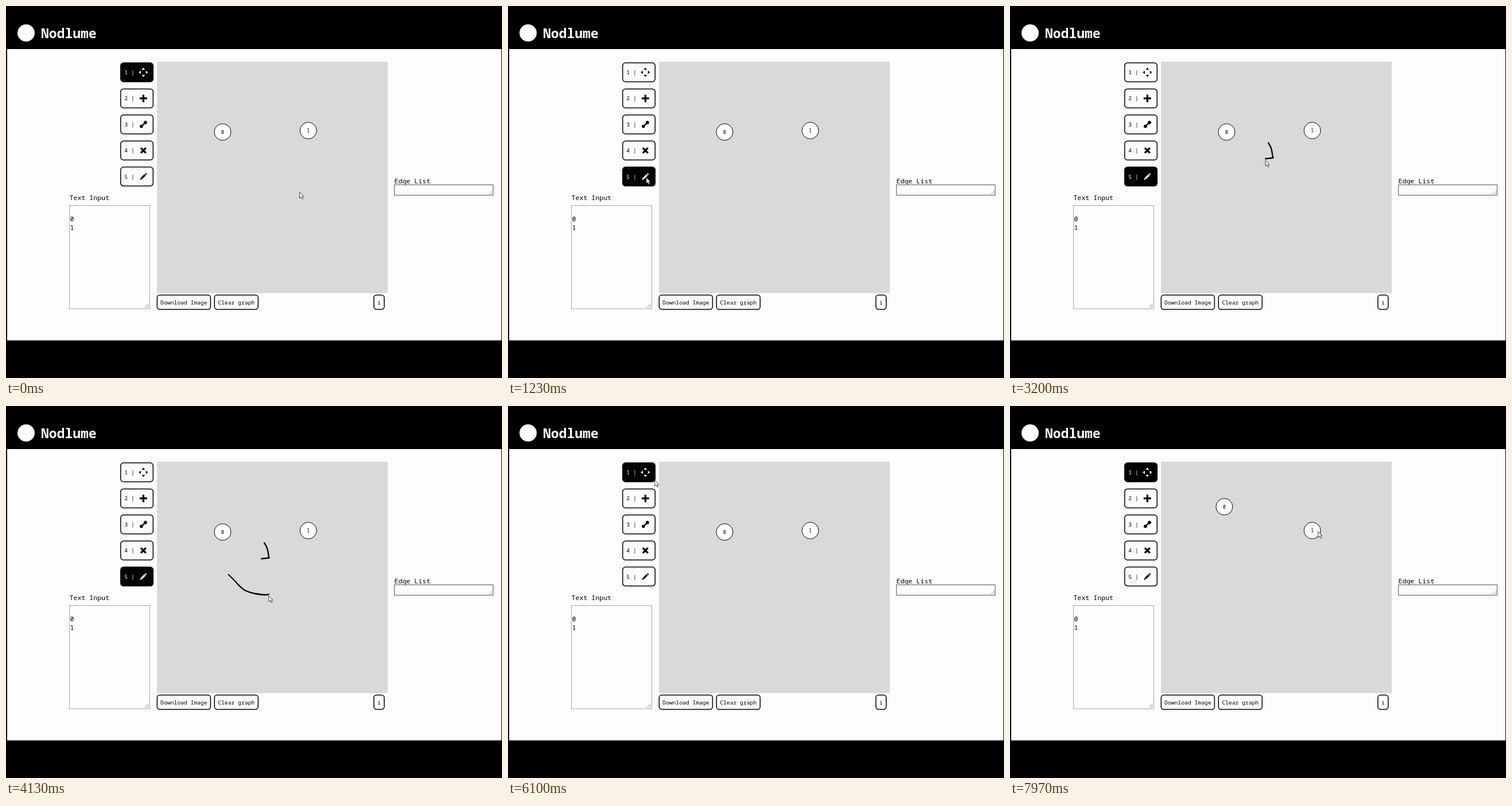
Animation of 864 by 648 pixels, one loop 8000 ms. Source, as an HTML page:

```html
<!DOCTYPE html>
<html lang="en">
<head>
<meta charset="utf-8">
<title>Graph editor</title>
<style>
  html, body { margin: 0; width: 100%; height: 100%; overflow: hidden; background: #000; }
  svg { display: block; width: 100%; height: 100%; }
  text { font-family: "Noto Sans Mono", "DejaVu Sans Mono", monospace; font-size: 9.7px; fill: #000; }
  .label { font-size: 11.6px; }
  .mid { text-anchor: middle; }
  .box { fill: #fdfdfd; stroke: #000; stroke-width: 1.5; }
  .tool { color: #000; }
  .tool text { fill: currentColor; }
  .tool.on { color: #fff; }
  .tool.on .box { fill: #000; }
  .icon { fill: currentColor; stroke: currentColor; stroke-width: 0; }
  .node circle { fill: #fff; stroke: #000; }
  .node text { font-size: 8.6px; text-anchor: middle; }
  .stroke { fill: none; stroke: #000; stroke-width: 2.3; stroke-linecap: round; stroke-linejoin: round; }
</style>
</head>
<body>
<svg viewBox="0 0 864 648">
  <rect width="864" height="648"/>
  <rect x="2" y="75" width="861" height="507.5" fill="#fdfdfd"/>
  <circle cx="35" cy="47" r="15" fill="#fff"/>
  <text x="61" y="55.5" style="font-size:23px;font-weight:700;fill:#fff">Nodlume</text>

  <rect x="263" y="97" width="402" height="403" fill="#d9d9d9"/>
  <g id="tools"></g>

  <text class="label" x="110.5" y="338">Text Input</text>
  <rect x="110.5" y="347.5" width="140" height="180" fill="#fdfdfd" stroke="#aaa89a"/>
  <text class="label" x="111.5" y="374.5">0</text>
  <text class="label" x="111.5" y="389.5">1</text>
  <path d="M242 525.5l6.5-6.5M246 525.5l2.5-2.5" stroke="#777"/>

  <text class="label" x="676.5" y="308.5">Edge List</text>
  <rect x="676.5" y="311.5" width="172" height="18" fill="#fdfdfd" stroke="#555"/>
  <path d="M841 328l6.5-6.5M845 328l2.5-2.5" stroke="#a5a55a"/>

  <g id="buttons"></g>
  <path id="nose" class="stroke" d="M450 238.5Q454 244 455.5 250T457 259L458.5 264.5L450 265.5L445 266"/>
  <path id="smile" class="stroke" d="M387.5 293.5L393 299L400 306Q408 316 416 321Q424 325 432 326.500T450 329Q458 329 465 325.500Q473 325 479 323.500Q488 319 495 310Q503 300 508.500 290"/>
  <g id="nodes"></g>
  <path id="cursor" d="M0 0V10.300L2.500 8L4.200 11.900L6 11.100L4.300 7.400H7.300Z" fill="#fff" stroke="#333" stroke-width=".9" stroke-linejoin="round"/>
</svg>
<script>
const LOOP = 8000;
const PEN_TOOL_AT = 1060, MOVE_TOOL_AT = 5850;
const NOSE = [2400, 3150], SMILE = [3650, 4550], DRAG = [6760, 7440];
const PEN_DY = 2.5;

const $ = id => document.getElementById(id);

const icons = [
  '<path d="M0-8l3 3.600h-6zM0 8l3-3.600h-6zM-8 0l3.600-3v6zM8 0l-3.600-3v6z"/>',
  '<path d="M-6.500 0H6.500M0-6.500V6.500" stroke-width="3.200"/>',
  '<path d="M-3.500 3.500L3.500-3.500" stroke-width="2.400"/><circle cx="-3.500" cy="3.300" r="2.900"/><circle cx="3.500" cy="-3.300" r="2.900"/>',
  '<path d="M-4.500-4.500L4.500 4.500M4.500-4.500L-4.500 4.500" stroke-width="3.300"/>',
  '<path d="M-3.300 3.300L3-3" stroke-width="3.400"/><path d="M3.700-3.700L5-5" stroke-width="3.400"/><path d="M-5.800 5.800l.8-3.500l2.700 2.700z"/>'
];

$('tools').innerHTML = icons.map((icon, i) => {
  const y = 115.5 + i * 45.4;
  return `<g class="tool" transform="translate(0 ${y})">
    <rect class="box" x="199.75" y="-16.500" width="56.500" height="33" rx="5"/>
    <text x="206.300" y="3.500">${i + 1} |</text>
    <g class="icon" transform="translate(239.300 0)">${icon}</g></g>`;
}).join('');

const button = (x, w, label) =>
  `<rect class="box" x="${x}" y="503.500" width="${w}" height="25" rx="4.500"/>
   <text class="mid" x="${x + w / 2}" y="519.500">${label}</text>`;
$('buttons').innerHTML = button(263.3, 93, 'Download Image') +
  button(363.2, 76, 'Clear graph') + button(640.8, 18, 'i');

$('nodes').innerHTML = [0, 1].map(n =>
  `<g class="node"><circle r="14.500"/><text y="3">${n}</text></g>`).join('');

const tools = [...$('tools').children];
const nodes = [...$('nodes').children];
const place = (el, x, y) => el.setAttribute('transform', `translate(${x} ${y})`);

// Pointer stops: time, x, y
const stops = [
  [0, 511.5, 324.5], [770, 267, 308.5], [930, 241, 299], [1250, 241, 299],
  [1930, 449, 244.5], [2360, 450, 241], [2400, 450, 241],
  [3150, 445, 268.5], [3220, 445, 268.5], [3600, 387.5, 296], [3650, 387.5, 296],
  [4550, 508.5, 292.5], [4620, 508.5, 292.5], [5100, 478, 370.5], [5200, 478, 370.5],
  [5760, 240, 118], [5960, 240, 118], [6640, 380.5, 220], [6760, 380.5, 220],
  [7440, 376.5, 176], [7520, 376.5, 176], [7970, 536.5, 218.5], [8000, 536.5, 218.5]
];

const ease = p => p * p * (3 - 2 * p);
const progress = (t, [a, b]) => ease(Math.min(1, Math.max(0, (t - a) / (b - a))));

function pointer(t) {
  const i = Math.max(1, stops.findIndex(s => s[0] >= t));
  const [t0, x0, y0] = stops[i - 1], [t1, x1, y1] = stops[i];
  const p = progress(t, [t0, t1]);
  return [x0 + (x1 - x0) * p, y0 + (y1 - y0) * p];
}

function drawStroke(path, t, span) {
  const p = progress(t, span), len = path.getTotalLength();
  path.style.visibility = p > 0 && t < MOVE_TOOL_AT ? 'visible' : 'hidden';
  path.style.strokeDasharray = p < 1 ? `${len * p} ${len * 2}` : 'none';
  if (t < span[0] || t > span[1]) return null;
  const tip = path.getPointAtLength(len * p);
  return [tip.x, tip.y + PEN_DY];
}

function render(t) {
  const active = t >= PEN_TOOL_AT && t < MOVE_TOOL_AT ? 4 : 0;
  tools.forEach((tool, i) => tool.classList.toggle('on', i === active));

  const onNose = drawStroke($('nose'), t, NOSE);
  const onSmile = drawStroke($('smile'), t, SMILE);
  place($('cursor'), ...(onNose || onSmile || pointer(t)));

  const drag = progress(t, DRAG);
  place(nodes[0], 377.3 - 4 * drag, 219.5 - 44 * drag);
  place(nodes[1], 526.6, 217);
}

const start = performance.now();
function tick() {
  render((performance.now() - start) % LOOP);
  requestAnimationFrame(tick);
}
tick();
</script>
</body>
</html>
```
